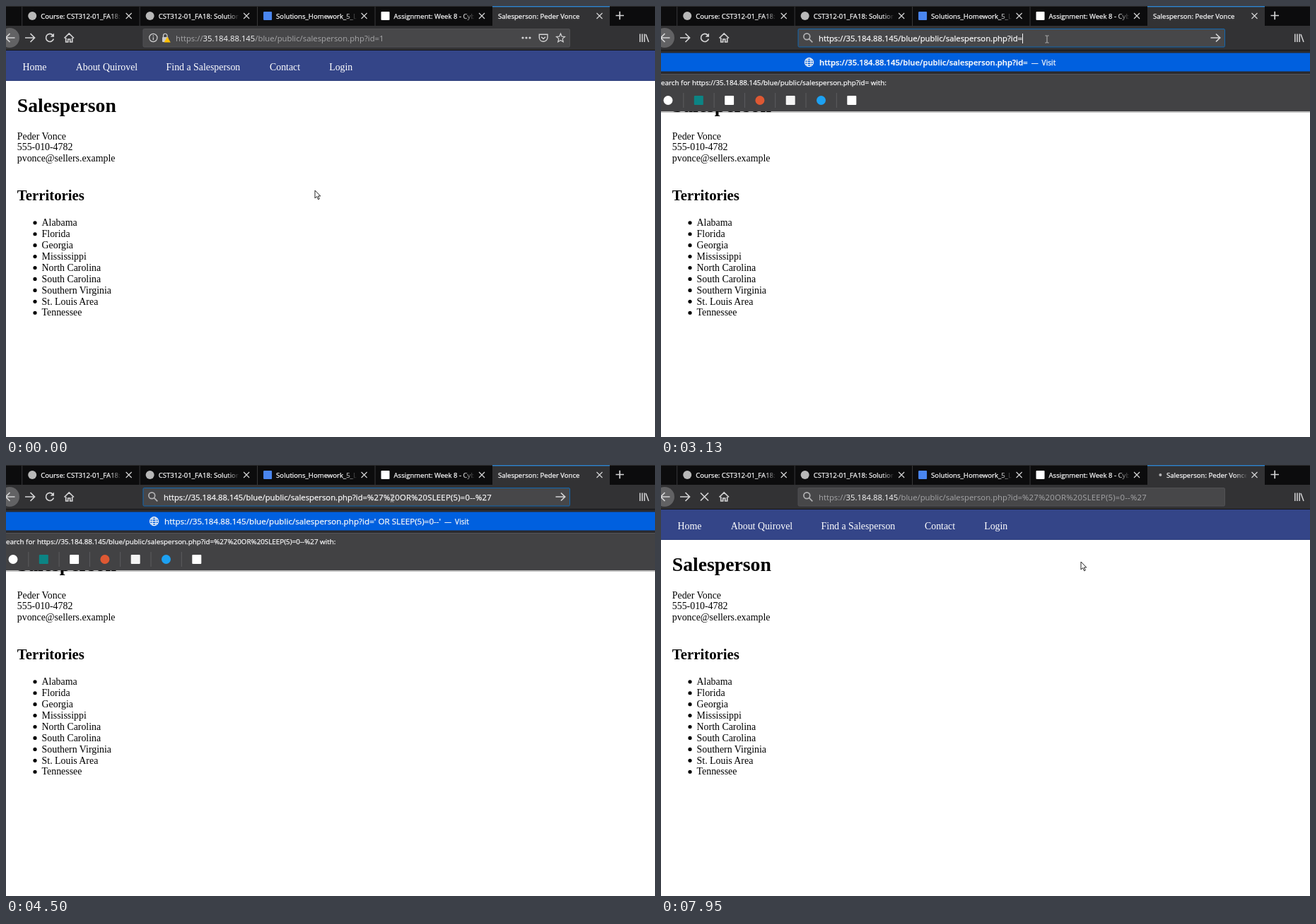
Write an HTML page that moves like this. It is 918x610 px and loops after 8 s.

```html
<!DOCTYPE html>
<html lang="en">
<head>
<meta charset="utf-8">
<title>Salesperson</title>
<style>
html, body { margin: 0; width: 100%; height: 100%; overflow: hidden; background: #fff; }
svg { display: block; width: 918px; height: 610px; }
text { white-space: pre; }
.page { font: 13.86px "Liberation Serif", "Times New Roman", serif; fill: #000; }
.ui { font: 9.6px "Open Sans", "Noto Sans", sans-serif; fill: #f9f9fa; }
.icon { fill: none; stroke: #d4d4d5; stroke-width: 1.7; }
.thin { stroke-width: 1.2; }

/* a hair of stroke gives light text its crisp weight */
.name { fill: url(#fade); stroke: url(#fade); stroke-width: .25; }
.lit, [data-mode=edit] #url { stroke: #f9f9fa; stroke-width: .25; }

/* parts that belong to some browser modes only */
.in { display: none; }
[data-mode=idle] .idle, [data-mode=focus] .focus,
[data-mode=edit] .edit, [data-mode=load] .load { display: inline; }

#field { fill: #474749; stroke: #515154; }
[data-mode=focus] #field, [data-mode=edit] #field { stroke: #1167b1; }
#url { font-size: 11.32px; }
[data-mode=idle] #url, [data-mode=load] #url { fill: #a6a6a8; }
#host { fill: #f9f9fa; }
[data-mode=edit] #tail, [data-mode=load] #tail { letter-spacing: .24px; }
[data-mode=focus] #tail, .all #url, .all #host { fill: #3394f5; }
.row { font-size: 11.2px; }
.small { font-size: 9.95px; }
.dash { fill: #b1b1b3; }
</style>
</head>
<body>
<svg id="stage" viewBox="0 0 918 610" data-mode="idle">
  <defs>
    <linearGradient id="fade" gradientUnits="userSpaceOnUse" x1="122" x2="141" y1="0" y2="0">
      <stop offset="0" stop-color="#f9f9fa"/>
      <stop offset="1" stop-color="#f9f9fa" stop-opacity="0"/>
    </linearGradient>
    <g id="globe" fill="none" stroke-width="1.2">
      <circle r="6"/>
      <ellipse rx="2.7" ry="6"/>
      <path d="M-6 0H6M-5.2-3H5.2M-5.2 3H5.2"/>
    </g>
    <path id="cross" d="M-4-4 4 4M4-4-4 4"/>
  </defs>

  <rect width="918" height="610" fill="#fff"/>
  <g class="page">
    <rect y="63" width="918" height="43" fill="#344588"/>
    <rect y="105" width="918" height="1" fill="#2a3a78"/>
    <g fill="#fff">
      <text x="23.5" y="91">Home</text>
      <text x="98.8" y="91">About Quirovel</text>
      <text x="226.6" y="91">Find a Salesperson</text>
      <text x="373" y="91">Contact</text>
      <text x="457.2" y="91">Login</text>
    </g>
    <text x="15.8" y="150" font-size="27.7" font-weight="700">Salesperson</text>
    <text x="15.8" y="188.5">Peder Vonce</text>
    <text x="15.8" y="204.4">555-010-4782</text>
    <text x="15.8" y="220.3">pvonce@sellers.example</text>
    <text x="15.8" y="275.4" font-size="20.8" font-weight="700">Territories</text>
    <g id="areas"></g>
  </g>

  <g class="ui">
    <rect width="918" height="28" fill="#0c0c0d"/>
    <g id="tabs"></g>
    <rect width="918" height="1" fill="#2c2c2d"/>
    <g transform="translate(688 0)">
      <rect width="166" height="28" fill="#323234"/>
      <rect width="166" height="1.5" fill="#2f7fc4"/>
      <text id="title" class="name" x="8" y="17.7">Salesperson: Peder Vonce</text>
      <use href="#cross" x="151.5" y="14" class="icon thin"/>
    </g>
    <circle id="dot" cy="14" r="2" fill="#b4b4b6" class="in load"/>
    <path d="M862.5 13.5H874M868.2 7.8V19.2" class="icon"/>

    <rect y="28" width="918" height="35" fill="#323234"/>
    <rect y="62" width="918" height="1" fill="#141416"/>
    <circle cx="5" cy="45" r="14" fill="#626264"/>
    <g class="icon">
      <path d="M12.5 45H0M5.5 39 -.5 45 5.5 51"/>
      <path d="M27 45H40M34.5 39 40.5 45 34.5 51"/>
      <g id="reload">
        <path d="M66.2 41.4A5.5 5.5 0 1 0 67.3 46.5"/>
        <path d="M68 38.5V43.8H62.7Z" fill="#d4d4d5" stroke="none"/>
      </g>
      <path id="stop" d="M56 39.5 67 50.5M67 39.5 56 50.5"/>
      <path d="M82.5 45.5 89.2 39 96 45.5M84.7 45V51H87.7V47H90.7V51H93.7V45"/>
      <path d="M896.8 39.5V51M900 39.5V51M903.2 39.5V51M905 40 909 51" stroke-width="1.5"/>
    </g>

    <rect id="field" x="194" y="32.5" width="603.5" height="25.5" rx="1.5"/>
    <g class="in idle focus">
      <g class="icon thin">
        <circle cx="208.3" cy="45" r="5.6"/>
        <path d="M208.3 44.2V48.2M208.3 41.6V42.9"/>
        <path d="M222.5 44V42A2.7 2.7 0 0 1 228 42V44"/>
        <path d="M760 50.2A5.7 5.7 0 0 1 754.3 45V40.3H766V45A5.7 5.7 0 0 1 760 50.2ZM757.2 43.7 760.1 46.5 763 43.7" stroke-width="1.4"/>
        <path d="M784.5 39 786.2 43.1 790.5 43.5 787.2 46.4 788.2 50.7 784.5 48.4 780.8 50.7 781.8 46.4 778.5 43.5 782.8 43.1Z"/>
      </g>
      <rect x="221" y="44" width="8.5" height="7" rx="1" fill="#c8c8ca"/>
      <path d="M228.2 43.5 232.8 51.5H223.6Z" fill="#ffbf00"/>
      <g fill="#d4d4d5">
        <circle cx="731" cy="45" r="1.6"/><circle cx="736" cy="45" r="1.6"/><circle cx="741" cy="45" r="1.6"/>
      </g>
    </g>
    <path id="chevron" d="M706.5 43 711 47.5 715.5 43" class="icon"/>
    <g class="in edit load icon" stroke-opacity=".75">
      <circle cx="206.3" cy="43.3" r="4.4"/>
      <path d="M209.6 46.6 214.3 51.3"/>
    </g>
    <path d="M777.5 45H790.5M785 39.5 790.7 45 785 50.5" class="in edit icon"/>
    <rect id="selection" y="38" height="15" fill="#f9f9fa" class="in focus"/>
    <text id="url" y="50"><tspan>https://</tspan><tspan id="host">35.184.88.145</tspan><tspan>/blue/public/salesperson.php?id=</tspan><tspan id="tail">1</tspan></text>
    <rect id="caret" x="511" y="39" width="1" height="14" fill="#f9f9fa"/>

    <g class="in edit">
      <rect id="shadow" width="918" fill="#000" fill-opacity=".25" y="63"/>
      <rect id="list" y="63" width="918" fill="#2a2a2e"/>
      <rect y="66.5" width="918" height="26" fill="#0060df"/>
      <use href="#globe" x="209.5" y="79.7" stroke="#f4f4f6"/>
      <text y="84.2" class="lit"><tspan id="visit" x="224"></tspan><tspan dx="5" class="small">—</tspan><tspan dx="5" font-size="10.2">Visit</tspan></text>
      <g id="history" class="row">
        <use href="#globe" x="209.5" y="105.3" stroke="#a8a8aa"/>
        <text x="224" y="110.3" class="lit">Salesperson: Peder Vonce</text>
        <text x="365.5" y="110.3" class="small dash">—</text>
        <text id="past" x="380.7" y="110.3" class="small" fill="#45a1ff"></text>
        <use href="#globe" x="209.5" y="131.3" stroke="#a8a8aa"/>
        <path id="laptop" d="M185.5 127H195V133.8H197V136H183.5V133.8H185.5Z" fill="#a8a8aa"/>
        <text x="224" y="136.2" class="lit">Salesperson: Peder Vonce</text>
        <text x="365.5" y="136.2" class="small dash">—</text>
        <text id="open" x="380.7" y="136.2" class="small"></text>
      </g>
      <g id="search">
        <rect y="96" width="918" height="53" fill="#424244"/>
        <rect y="96" width="918" height="1" fill="#555558"/>
        <text id="query" class="lit" x="-5.4" y="111.6" font-size="9.83"></text>
        <g id="engines"></g>
      </g>
    </g>
  </g>

  <g id="pointer">
    <path id="arrow" d="M0 0V11L2.6 8.6 4.6 12.8 6.3 12 4.4 8H7.8Z" fill="#fff" stroke="#111" stroke-width=".9"/>
    <path id="beam" d="M-2.5-5H-.6L0-4.4.6-5H2.5M0-4.4V4.4M-2.5 5H-.6L0 4.4.6 5H2.5" fill="none" stroke="#b9b9ba"/>
  </g>
</svg>

<script>
const LOOP = 8000, STEP = 120;
const BASE = "https://35.184.88.145/blue/public/salesperson.php?id=";
const PAYLOAD = "%27%20OR%20SLEEP(5)=0--%27";
const EXTRA = "%20--";

// bursts of picture changes: start time and number of steps
const BURSTS = [[0, 1], [750, 7], [1590, 3], [1980, 2], [2350, 1], [3130, 4], [3740, 1],
  [3990, 3], [4380, 4], [4890, 7], [5730, 1], [5880, 7], [6720, 4], [7350, 6]];

// pointer path: time, x, y
const PATH = [[630, 437, 261], [750, 428, 240], [990, 350, 95], [1110, 300, 10], [1230, 520, 44],
  [1350, 712, 46], [1470, 516, 50], [1590, 522, 50], [1830, 546, 47], [4740, 546, 47],
  [4890, 540, 59], [5010, 525, 85], [5130, 500, 112], [5250, 462, 132], [5370, 421, 145],
  [5490, 360, 162], [5610, 310, 159], [5730, 338, 158], [6000, 440, 188], [6120, 490, 185],
  [6360, 570, 155], [6600, 602, 138], [6720, 603, 137], [7080, 594, 137]];

const $ = id => document.getElementById(id);
const show = (id, on) => { $(id).style.display = on ? "" : "none"; };
const put = (id, text) => { if ($(id).textContent !== text) $(id).textContent = text; };
const set = (id, attrs) => { for (const k in attrs) $(id).setAttribute(k, attrs[k]); };

const areas = ["Alabama", "Florida", "Georgia", "Mississippi", "North Carolina",
  "South Carolina", "Southern Virginia", "St. Louis Area", "Tennessee"];
$("areas").innerHTML = areas.map((name, i) => {
  const y = 311 + i * 15.93;
  return `<circle cx="41" cy="${y - 4.2}" r="2.6"/><text x="50.6" y="${y}">${name}</text>`;
}).join("");

const mark = (x, y, size, color, round) =>
  `<rect x="${x - size / 2}" y="${y - size / 2}" width="${size}" height="${size}" rx="${round ? size / 2 : 1}" fill="${color}"/>`;

const tabs = [["Course: CST312-01_FA18:", "#b8b8b8", true], ["CST312-01_FA18: Solutions", "#b8b8b8", true],
  ["Solutions_Homework_5_L", "#4a86f0"], ["Assignment: Week 8 - Cyb", "#fff"]];
$("tabs").innerHTML = tabs.map(([name, color, round], i) => `
  <g transform="translate(${22.2 + i * 166.45} 0)">
    <rect class="back" x="1" y="1" width="165" height="27" fill="#0c0c0d"/>
    <rect width="1" height="28" fill="#3a3a3c"/>
    ${mark(15, 14, 12, color, round)}
    <text class="name" x="27" y="17.7">${name}</text>
    <use href="#cross" x="151.5" y="14" class="icon thin"/>
  </g>`).join("");
const backs = document.querySelectorAll(".back");

const engines = [["#fff", true], ["#0c8484"], ["#fff"], ["#de5833", true], ["#f4f4f4"], ["#1da1f2", true], ["#fff"]];
$("engines").innerHTML = engines.map(([color, round], i) => {
  const x = 10 + i * 43.3;
  const line = i < 6 ? `<rect x="${x + 21.3}" y="123" width="1" height="21" fill="#5c5c5f"/>` : "";
  return mark(x, 133.5, 13, color, round) + line;
}).join("");
put("past", BASE + decodeURIComponent(PAYLOAD));

function snap(t) {
  const [start, count] = BURSTS.findLast(b => b[0] <= t);
  return start + STEP * Math.min(count - 1, Math.floor((t - start) / STEP));
}

function pointerAt(t) {
  const i = PATH.findIndex(p => p[0] > t);
  if (i === 0) return PATH[0].slice(1);
  if (i < 0) return PATH.at(-1).slice(1);
  const [t0, x0, y0] = PATH[i - 1], [t1, x1, y1] = PATH[i];
  const k = (t - t0) / (t1 - t0);
  return [x0 + (x1 - x0) * k, y0 + (y1 - y0) * k];
}

function typedAt(t) {
  if (t < 3130) return "1";
  if (t < 3250) return "";
  const cut = t < 3990 ? 5 : t < 4110 ? 4 : t < 4230 ? 3 : 0;
  return PAYLOAD + EXTRA.slice(0, cut);
}

function drawPopup(t, typed) {
  const tall = t >= 3370 && t < 4380, drop = tall ? 51 : 0;
  const switchTab = t >= 3740;
  set("list", { height: 86 + drop });
  set("shadow", { height: 88 + drop });
  set("search", { transform: `translate(0 ${drop})` });
  set("visit", { "font-size": typed ? 11.66 : 11.25, "font-weight": typed ? 400 : 600 });
  show("history", tall);
  show("laptop", switchTab);
  put("visit", BASE + decodeURIComponent(typed));
  put("open", switchTab ? "Switch to Tab" : BASE + "1");
  set("open", { fill: switchTab ? "#30e60b" : "#45a1ff" });
  put("query", `Search for ${BASE}${typed} with:`);
}

function draw(now) {
  const t = snap(now % LOOP);
  const mode = t < 1980 ? "idle" : t < 3130 ? "focus" : t < 4620 ? "edit" : "load";
  const all = mode === "focus" && t < 2350;
  const typed = typedAt(t);
  $("stage").dataset.mode = mode;
  $("stage").classList.toggle("all", all);

  put("tail", typed);
  set("url", { x: t < 3130 ? 240 : 223 });
  set("selection", { x: all ? 240 : 528.5, width: all ? 295 : 6.5 });
  show("caret", mode === "edit" && !typed);
  show("chevron", mode === "focus" && t >= 2100);
  show("stop", t >= 4890);
  show("reload", t < 4890);
  drawPopup(t, typed);

  set("title", { x: mode === "load" ? 27 : 8 });
  set("dot", { cx: 703 + 5 * Math.sin((t - 5370) / 1050 * 2 * Math.PI - 2.13) });

  const [x, y] = pointerAt(t);
  const beam = y > 32 && y < 58;
  set("pointer", { transform: `translate(${x} ${y})` });
  show("beam", beam);
  show("arrow", !beam);
  backs.forEach((b, i) => {
    const over = y < 28 && Math.floor((x - 22.2) / 166.45) === i;
    b.setAttribute("fill", over ? "#252526" : "#0c0c0d");
  });
}

function tick() {
  draw(performance.now());
  requestAnimationFrame(tick);
}
tick();
</script>
</body>
</html>
```
